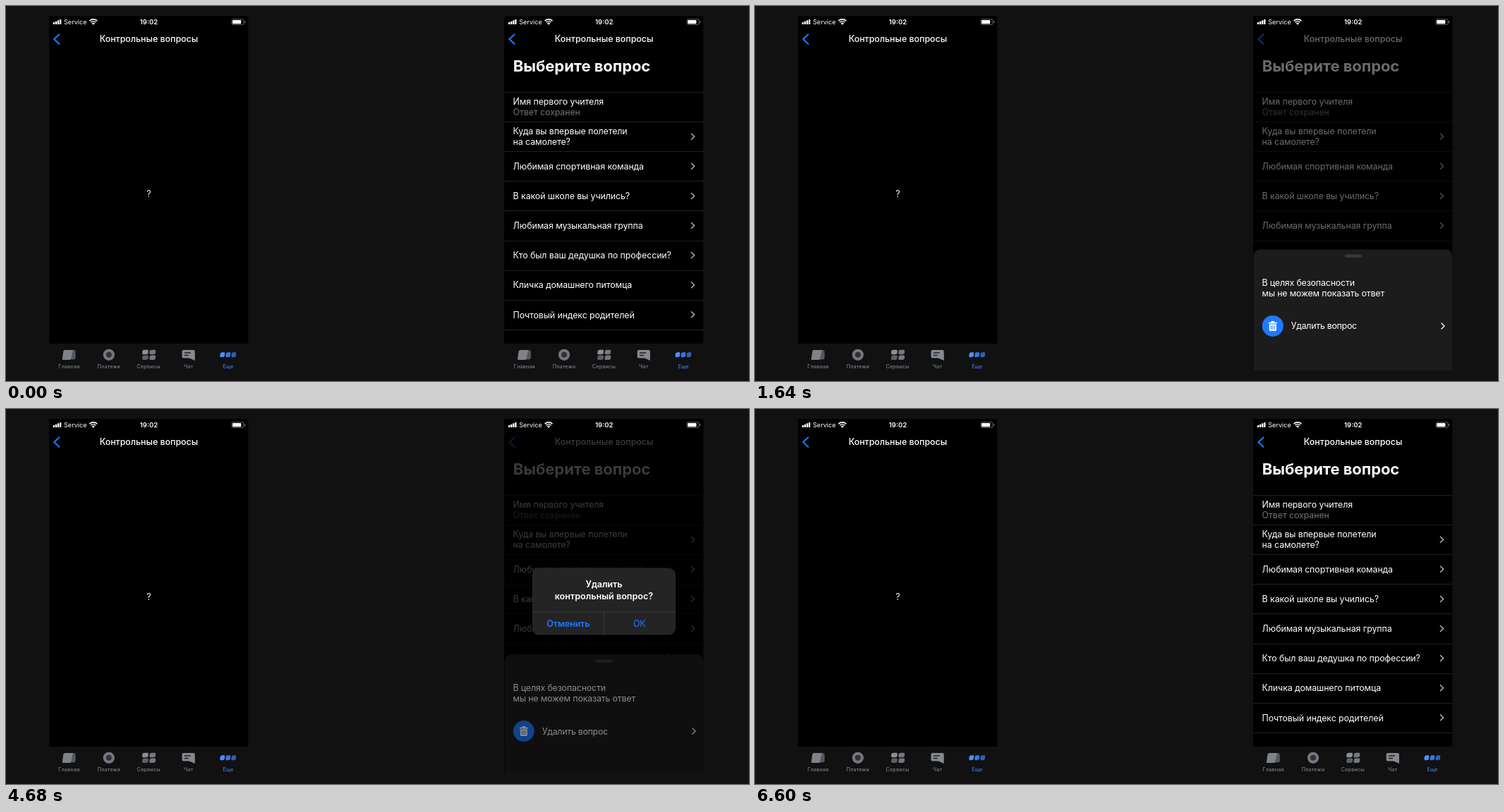
Animation of 1053 by 532 pixels, one loop 6.68 s. Source, as an HTML page with a canvas:

```html
<!DOCTYPE html>
<html lang="ru">
<head>
<meta charset="utf-8">
<title>Контрольные вопросы</title>
<style>
html, body { margin: 0; width: 100%; height: 100%; overflow: hidden; background: #111; }
canvas { display: block; width: 1053px; height: 532px; }
</style>
</head>
<body>
<canvas id="stage"></canvas>
<script>
const W = 1053, H = 532, LOOP = 6680;
const BLUE = '#1f7aff', PAGE = '#111';
const PHONE = { x: 706, y: 14, w: 282, h: 503 };
const LEFT_SHIFT = -645.2;
const ROW = 42.1;
const canvas = document.getElementById('stage');
const ctx = canvas.getContext('2d');
const dpr = window.devicePixelRatio || 1;
canvas.width = Math.round(W * dpr);
canvas.height = Math.round(H * dpr);

const clamp = v => Math.max(0, Math.min(1, v));
const easeOut = v => 1 - Math.pow(1 - clamp(v), 3);
const easeIn = v => Math.pow(clamp(v), 2);

// Damped spring that peaks 1.8% past its goal after 150 ms.
function spring(t) {
  if (t <= 0) return 0;
  const w = Math.PI / 150, a = 0.0268;
  return 1 - Math.exp(-a * t) * (Math.cos(w * t) + a / w * Math.sin(w * t));
}

function text(str, x, y, { size = 12.4, weight = 400, color = '#fff', align = 'left', track = -0.09 } = {}) {
  ctx.font = `${weight} ${size}px Inter, "Noto Sans", sans-serif`;
  ctx.letterSpacing = track + 'px';
  ctx.textAlign = align;
  ctx.fillStyle = color;
  ctx.fillText(str, x, y);
}

function rect(x, y, w, h, color) {
  ctx.fillStyle = color;
  ctx.fillRect(x, y, w, h);
}

function round(x, y, w, h, r, color) {
  ctx.beginPath();
  ctx.roundRect(x, y, w, h, r);
  ctx.fillStyle = color;
  ctx.fill();
}

function disc(x, y, r, color) {
  ctx.beginPath();
  ctx.arc(x, y, r, 0, Math.PI * 2);
  ctx.fillStyle = color;
  ctx.fill();
}

// dir 1 points right, -1 points left
function chevron(x, y, w, h, dir, color, line) {
  ctx.beginPath();
  ctx.moveTo(x - dir * w / 2, y - h / 2);
  ctx.lineTo(x + dir * w / 2, y);
  ctx.lineTo(x - dir * w / 2, y + h / 2);
  ctx.strokeStyle = color;
  ctx.lineWidth = line;
  ctx.lineCap = ctx.lineJoin = 'round';
  ctx.stroke();
}

function statusBar() {
  for (let i = 0; i < 4; i++) {
    const h = 3 + i * 1.35;
    round(711.9 + i * 3.1, 26 - h, 2.3, h, 0.5, '#fff');
  }
  text('Service', 727.2, 25.8, { size: 9.1, track: 0 });
  ctx.strokeStyle = '#fff';
  ctx.lineCap = 'butt';
  ctx.lineWidth = 1.6;
  for (const r of [4.9, 7.7]) {
    ctx.beginPath();
    ctx.arc(769, 26.6, r, -Math.PI * 0.75, -Math.PI * 0.25);
    ctx.stroke();
  }
  ctx.beginPath();
  ctx.moveTo(769, 26.8);
  ctx.arc(769, 26.8, 3, -Math.PI * 0.75, -Math.PI * 0.25);
  ctx.fillStyle = '#fff';
  ctx.fill();
  text('19:02', 847.7, 25.8, { size: 9.5, weight: 600, align: 'center', track: 0 });
  ctx.beginPath();
  ctx.roundRect(965, 18.8, 17.2, 7.6, 2);
  ctx.strokeStyle = '#7c7c7c';
  ctx.lineWidth = 0.8;
  ctx.stroke();
  round(966.2, 20, 12.2, 5.2, 1, '#fff');
  round(983.2, 21.2, 1.1, 2.8, 0.5, '#7c7c7c');
}

function navBar() {
  chevron(717, 47, 7.2, 13.6, -1, BLUE, 2);
  text('Контрольные вопросы', 847.6, 51.3, { weight: 500, align: 'center', track: 0 });
}

function leaf(x, y, w, h, color) {
  round(x, y, w, h, [h * 0.5, 1, h * 0.5, 1], color);
}

function tabBar() {
  const names = ['Главная', 'Платежи', 'Сервисы', 'Чат', 'Еще'];
  names.forEach((name, i) => text(name, 734.6 + i * 56.35, 514, {
    size: 7.3, weight: 500, align: 'center', track: 0.1,
    color: i === 4 ? '#3b77e6' : '#777a80'
  }));
  // card
  round(734, 488, 9.8, 13.6, [2, 3, 3, 2], '#54575c');
  ctx.beginPath();
  ctx.moveTo(729, 488);
  ctx.lineTo(740, 488);
  ctx.lineTo(737.5, 500);
  ctx.quadraticCurveTo(737, 502, 735, 502);
  ctx.lineTo(726, 502);
  ctx.quadraticCurveTo(725, 502, 725, 500.5);
  ctx.lineTo(726.5, 490);
  ctx.quadraticCurveTo(727, 488, 729, 488);
  ctx.fillStyle = '#7f8389';
  ctx.fill();
  // coin
  disc(791, 494.8, 8.1, '#74777d');
  disc(791, 494.8, 4, '#303237');
  // services
  leaf(838.3, 487.8, 8.6, 6.5, '#8b8f95');
  leaf(848.6, 487.8, 8.6, 6.5, '#74777d');
  leaf(838.3, 495.6, 8.6, 6.5, '#5d6066');
  leaf(848.6, 495.6, 8.6, 6.5, '#74777d');
  // chat
  round(894.7, 488, 18.2, 11.5, 2, '#858990');
  ctx.beginPath();
  ctx.moveTo(904, 499);
  ctx.lineTo(912.9, 497);
  ctx.lineTo(912.9, 503);
  ctx.closePath();
  ctx.fill();
  rect(898, 491.2, 9, 1.5, '#222');
  rect(898, 494.8, 6, 1.5, '#222');
  // more
  ['#4f8dff', '#3c74df', '#315fb8'].forEach((c, i) => leaf(948.6 + i * 8, 491.2, 6.6, 7, c));
}

function questions() {
  text('Выберите вопрос', 718.8, 92.6, { size: 22, weight: 700, track: -0.06 });
  for (let i = 0; i < 9; i++) rect(PHONE.x, Math.round(122 + i * ROW), PHONE.w, 1, '#202020');
  text('Имя первого учителя', 718.6, 140);
  text('Ответ сохранен', 718.6, 155.2, { color: '#737378' });
  text('Куда вы впервые полетели', 718.6, 182);
  text('на самолете?', 718.6, 197.2);
  [
    'Любимая спортивная команда',
    'В какой школе вы учились?',
    'Любимая музыкальная группа',
    'Кто был ваш дедушка по профессии?',
    'Кличка домашнего питомца',
    'Почтовый индекс родителей'
  ].forEach((q, i) => text(q, 718.6, 232 + i * ROW));
  for (let i = 0; i < 7; i++) chevron(973.5, 185.2 + i * ROW, 4.2, 8, 1, '#b8b8ba', 1.4);
}

function trash(x, y) {
  round(x - 6, y - 5.2, 12, 1.8, 0.6, '#fff');
  round(x - 2.4, y - 7, 4.8, 2.2, 0.8, '#fff');
  round(x - 5, y - 2.6, 10, 9.6, [0, 0, 1.5, 1.5], '#fff');
  for (const dx of [-2.4, 0, 2.4]) rect(x + dx - 0.5, y - 0.8, 1, 5.8, BLUE);
}

function sheet(y, pressed) {
  round(706.6, y, 281.6, 220, [9, 9, 0, 0], '#1c1c1c');
  round(835.5, y + 7, 24.2, 4.2, 2.1, '#38383a');
  text('В целях безопасности', 718.6, y + 51.4, { track: -0.18 });
  text('мы не можем показать ответ', 718.6, y + 66.6, { track: -0.18 });
  if (pressed) rect(706.6, y + 87, 281.6, 42.4, '#303032');
  disc(733.8, y + 108.5, 15, BLUE);
  trash(733.8, y + 108.5);
  text('Удалить вопрос', 759.8, y + 113, { track: -0.28 });
  chevron(975, y + 108.5, 4.2, 8.2, 1, '#f4f4f4', 1.4);
  if (pressed) disc(880.7, y + 104.3, 7.8, 'rgba(31, 70, 180, 0.42)');
}

function dialog(alpha, scale) {
  if (alpha <= 0) return;
  ctx.save();
  ctx.globalAlpha = alpha;
  ctx.translate(847.4, 273);
  ctx.scale(scale, scale);
  ctx.translate(-847.4, -273);
  round(745.8, 225.6, 203.2, 95, 10, '#242424');
  text('Удалить', 847.4, 253, { size: 12.6, weight: 600, align: 'center' });
  text('контрольный вопрос?', 847.4, 269.5, { size: 12.6, weight: 600, align: 'center', track: 0 });
  rect(745.8, 287.6, 203.2, 0.9, '#3b3b3c');
  rect(847, 288, 0.9, 32.6, '#3b3b3c');
  text('Отменить', 796.8, 308.5, { size: 12.6, weight: 600, align: 'center', color: BLUE, track: -0.2 });
  text('ОК', 897.8, 308.5, { align: 'center', color: BLUE });
  ctx.restore();
}

function dim(a) {
  if (a > 0) rect(PHONE.x, PHONE.y, PHONE.w + 0.4, PHONE.h, `rgba(0, 0, 0, ${a})`);
}

function leftPhone() {
  ctx.save();
  ctx.translate(LEFT_SHIFT, 0);
  rect(706.2, 14, 282.2, 465, '#000');
  statusBar();
  navBar();
  text('?', 847.6, 271, { align: 'center' });
  tabBar();
  ctx.restore();
}

function rightPhone(t) {
  const opened = t < 5720 ? spring(t - 1490) : 1 - easeIn((t - 5720) / 300);
  const alertIn = t < 5720 ? easeOut((t - 4380) / 280) : 1 - easeOut((t - 5720) / 220);
  const alertScale = t < 5720 ? 1.15 - 0.15 * alertIn : 1;

  ctx.save();
  ctx.beginPath();
  ctx.rect(PHONE.x, PHONE.y, PHONE.w + 0.4, PHONE.h);
  ctx.clip();
  rect(PHONE.x, PHONE.y, PHONE.w + 0.4, 465, '#000');
  navBar();
  questions();
  tabBar();
  dim(0.58 * clamp(opened));
  if (opened > 0) sheet(517 - 168.5 * opened, t >= 4040 && t < 4380);
  dim(0.46 * alertIn);
  dialog(alertIn, alertScale);
  statusBar();
  ctx.restore();
}

function draw(t) {
  ctx.setTransform(dpr, 0, 0, dpr, 0, 0);
  ctx.textBaseline = 'alphabetic';
  rect(0, 0, W, H, PAGE);
  leftPhone();
  rightPhone(t);
}

const start = performance.now();
function tick() {
  draw((performance.now() - start) % LOOP);
  requestAnimationFrame(tick);
}
tick();
</script>
</body>
</html>
```
